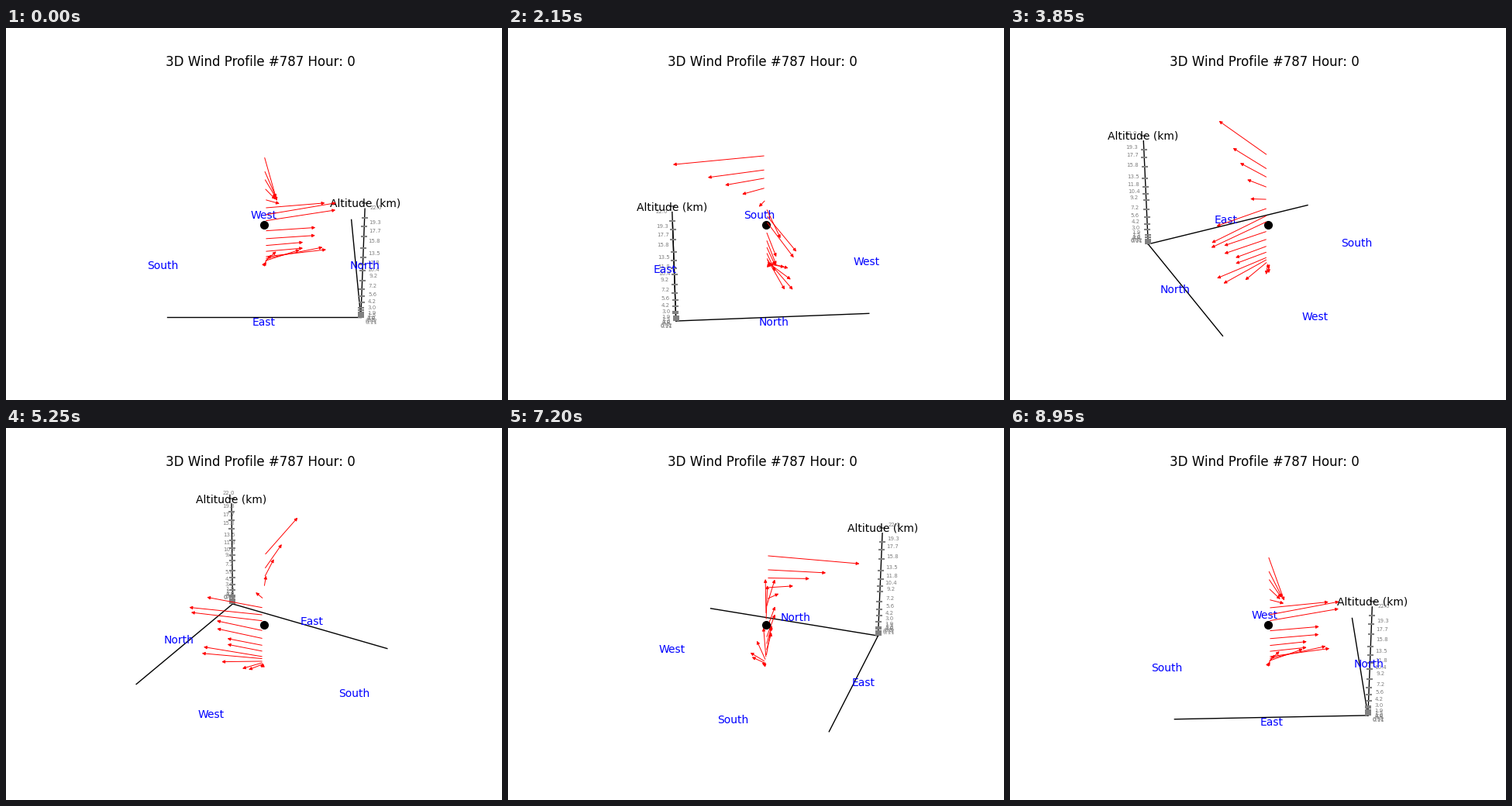
A matplotlib script that plays this animation: 640 by 480 pixels, repeating every 9 s.

```python
import numpy as np
import matplotlib.pyplot as plt
from matplotlib.animation import FuncAnimation
from matplotlib.patches import FancyArrowPatch

W, H, DPI = 640, 480, 100
FRAMES, INTERVAL = 180, 50

# Perspective camera
ELEV = np.radians(30)
DIST = 10.0
SCALE = 1997.84              # pixels per unit at distance 1
CENTER = (333.0, 237.4)      # pixel of the scene's middle

# Scene sizes in box units
HALF_Z = 0.4114              # half the height between 0 and TOP km
TOP = 22.0
AXIS_TOP = TOP / 1.05
CORNER = 0.605
LABEL_R = 1.1 * CORNER
DOT_KM = 8.42

# Altitudes (km) named on the scale
ALTITUDES = ("0.11 0.32 0.5 0.8 1.0 1.5 1.9 3.0 4.2 5.6 7.2 9.2 10.4 "
             "11.8 13.5 15.8 17.7 19.3 22.0").split()
levels = np.array(ALTITUDES, dtype=float)
n = np.arange(len(levels))


def bump(center, width):
    """Flat-topped bell over the level index."""
    return np.exp(-((n - center) / width) ** 6)


# Wind by level: easterly near the ground and the jet, westerly on top
east = (-0.045 - 0.108 * bump(3.8, 2.3) - 0.118 * bump(11.8, 1.1)
        + 0.108 * np.maximum(n - 13, 0) + 0.11 * bump(18.5, 1))
north = (0.08 - 0.065 * bump(0, 2) + 0.19 * bump(8.7, 4.8)
         + 0.17 * bump(5.2, 1.3) + 0.08 * bump(9.5, 1)
         + 0.235 * bump(12, 1.5))


def project(x, y, km, azim):
    """Return pixel x, pixel y and nearness to the camera."""
    z = (2 * km / TOP - 1) * HALF_Z
    c, s = np.cos(azim), np.sin(azim)
    side, front = y * c - x * s, x * c + y * s
    near = front * np.cos(ELEV) + z * np.sin(ELEV)
    up = z * np.cos(ELEV) - front * np.sin(ELEV)
    k = SCALE / (DIST - near)
    return CENTER[0] + k * side, CENTER[1] - k * up, near


fig = plt.figure(figsize=(W / DPI, H / DPI), dpi=DPI, facecolor="white")
ax = fig.add_axes([0, 0, 1, 1])
ax.set_xlim(0, W)
ax.set_ylim(H, 0)
ax.axis("off")

ax.text(328, 49.27, "3D Wind Profile #787 Hour: 0", fontsize=12, ha="center")

# Three axis lines from one floor corner
ORIGIN = (CORNER, CORNER, 0)
ENDS = [(-CORNER, CORNER, 0), (CORNER, -CORNER, 0),
        (CORNER, CORNER, AXIS_TOP)]
lines = [ax.plot([], [], color="black", lw=1, zorder=2)[0] for _ in ENDS]
ticks, = ax.plot([], [], ls="", marker="_", ms=6, mew=1.5, color="gray",
                 zorder=2.1)

# Texts with their places in the scene
labels = []


def add_label(text, place, color, size):
    t = ax.text(0, 0, text, color=color, fontsize=size, ha="center",
                va="center", zorder=3)
    labels.append((t, place))


for name, km in zip(ALTITUDES, levels):
    add_label(name, (LABEL_R, LABEL_R, km), "gray", 5)
for name, x, y in [("North", 0, 1), ("South", 0, -1),
                   ("East", 1, 0), ("West", -1, 0)]:
    add_label(name, (x * LABEL_R, y * LABEL_R, 0), "blue", 10)
add_label("Altitude (km)", (CORNER, CORNER, TOP - 0.15), "black", 10)

arrows = []
for _ in levels:
    arrow = FancyArrowPatch((0, 0), (1, 1), arrowstyle="-|>",
                            mutation_scale=6, lw=0.7, color="red")
    ax.add_patch(arrow)
    arrows.append(arrow)

dot_x, dot_y, dot_near = project(0, 0, DOT_KM, 0)
ax.plot([dot_x], [dot_y], "o", color="black", ms=7, mew=1,
        zorder=5 + dot_near)


def update(i):
    azim = 2 * np.pi * i / FRAMES
    x0, y0, _ = project(*ORIGIN, azim)
    for line, end in zip(lines, ENDS):
        x1, y1, _ = project(*end, azim)
        line.set_data([x0, x1], [y0, y1])
    ticks.set_data(*project(CORNER, CORNER, levels, azim)[:2])
    for t, place in labels:
        t.set_position(project(*place, azim)[:2])
    for arrow, km, u, v in zip(arrows, levels, east, north):
        xa, ya, near_a = project(0, 0, km, azim)
        xb, yb, near_b = project(u, v, km, azim)
        arrow.set_positions((xa, ya), (xb, yb))
        arrow.set_zorder(5 + max(near_a, near_b))
    return []


anim = FuncAnimation(fig, update, frames=FRAMES, interval=INTERVAL,
                     repeat=True, repeat_delay=0, blit=False)
plt.show()
```
